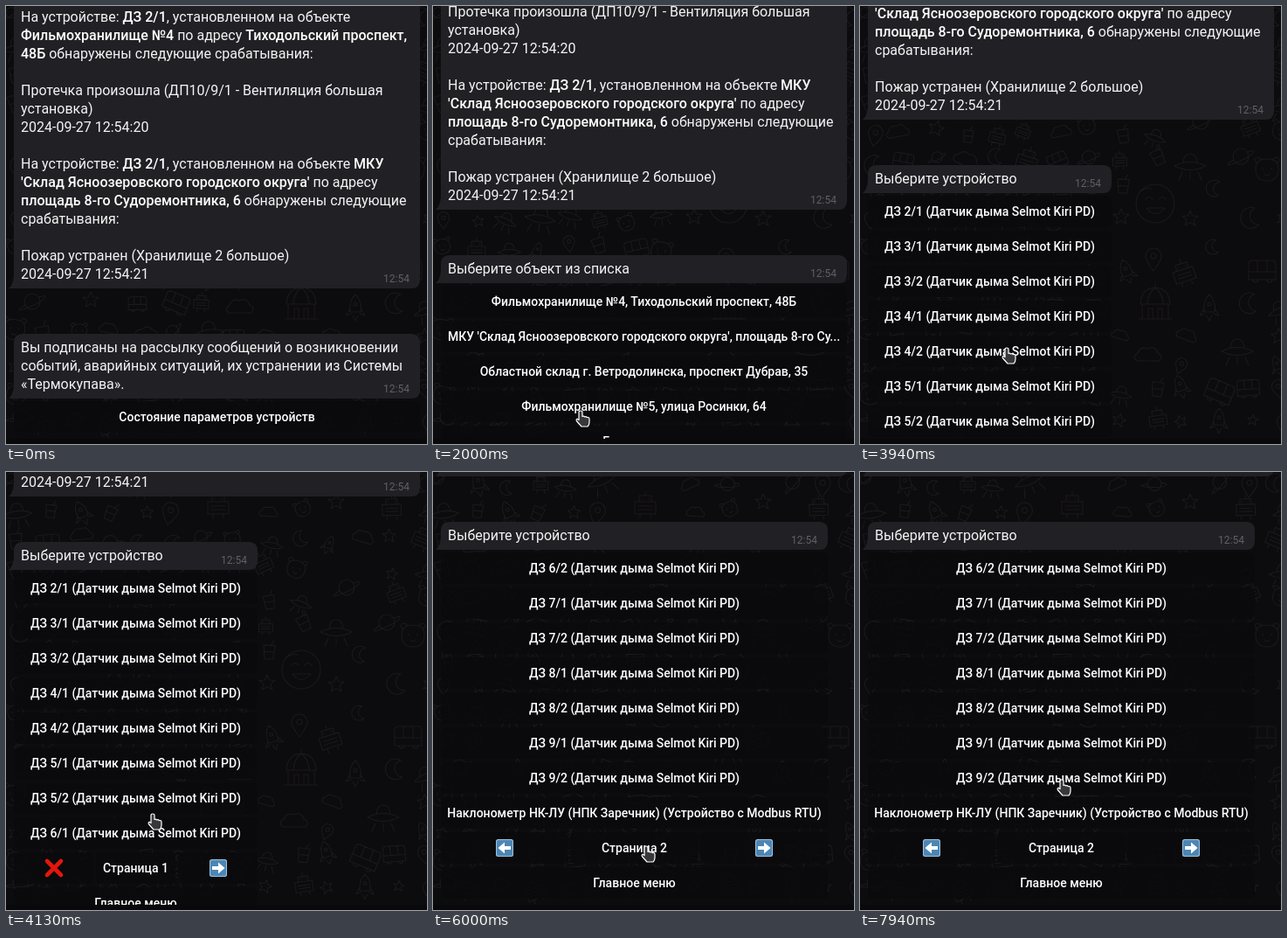
Write an HTML page that moves like this. It is 482 px wide and 501 px high and loops after 8000 ms.

```html
<!DOCTYPE html>
<html lang="ru">
<head>
<meta charset="utf-8">
<style>
html, body { margin: 0; width: 100%; height: 100%; overflow: hidden; background: #0c0b0e; }
svg { display: block; width: 482px; height: 501px; font-family: Roboto, sans-serif; }
.msg { font-size: 16px; fill: #f4f4f5; }
.msg tspan { font-weight: 500; fill: #fff; }
.time { font-size: 12px; fill: #616064; text-anchor: end; }
.label { font-size: 14px; font-weight: 500; fill: #fff; text-anchor: middle; }
.bubble { fill: #212024; }
.key { fill: #0a090c; fill-opacity: .78; }
.doodle { fill: none; stroke: #1a191c; stroke-linecap: round; stroke-linejoin: round; }
.cursor { fill: #38383b; stroke: #fff; stroke-width: 1.2; stroke-linejoin: round; }
</style>
</head>
<body>
<svg id="stage" viewBox="0 0 482 501">
  <rect width="482" height="501" fill="#0c0b0e"/>
  <g id="wall" class="doodle"></g>
  <g id="chat"></g>
  <rect y="495" width="482" height="6" fill="#09080b"/>
  <g id="cursor" class="cursor">
    <path id="arrow" d="M0 0V15L3.6 11.8L6 17L8.4 16L6.1 10.9H11Z"/>
    <path id="hand" d="M-2 1.8Q-2 0 0 0Q2 0 2 1.8V6.5Q3.6 5.5 4.6 7Q6.3 6 7.3 7.6Q10 7 10 9.6V13Q10 16 8 18H1L-4.4 12Q-5.6 10 -4 9.2L-2 10.6Z"/>
  </g>
</svg>
<script>
const LOOP = 8000;
const $ = id => document.getElementById(id);

function add(parent, tag, attrs, text) {
  const el = document.createElementNS('http://www.w3.org/2000/svg', tag);
  for (const k in attrs) el.setAttribute(k, attrs[k]);
  if (text) el.textContent = text;
  parent.appendChild(el);
  return el;
}

// ---- wallpaper ----
const SHAPES = {
  star: 'M0-9L2.6-3L9-2.6L4 1.6L5.8 8L0 4.5L-5.8 8L-4 1.6L-9-2.6L-2.6-3Z',
  planet: 'M-9 0A9 9 0 1 0 9 0A9 9 0 1 0-9 0M-8 4C-20 11-16 12 0 5S20-10 8-5',
  face: 'M-22 0A22 22 0 1 0 22 0A22 22 0 1 0-22 0M-11-5Q-7-10-3-5M4-5Q8-10 12-5M-10 5Q0 18 11 5ZM-17-14Q-10-19-4-17',
  dome: 'M-17 0Q-16-18 0-19Q16-18 17 0ZM-15 0V17H15V0M-8 17V5H-3V17M3 17V5H8V17M0-19V-25M-19 17H19M-9-1Q-8-13 0-19Q8-13 9-1',
  rocket: 'M0-15Q8-8 6 5H-6Q-8-8 0-15ZM-6 1L-11 9L-5 7M6 1L11 9L5 7M-3 9L0 15L3 9M-2-4A2 2 0 1 0 2-4A2 2 0 1 0-2-4',
  ufo: 'M-18 3Q0-6 18 3Q0 12-18 3ZM-8-1Q-7-11 0-11Q7-11 8-1M-9 10L-13 19M9 10L13 19M0 10V18',
  bear: 'M-13 0Q-14-13 0-13Q14-13 13 0Q12 12 0 12Q-12 12-13 0M-11-8Q-18-14-10-15L-6-12M11-8Q18-14 10-15L6-12M-5-3V-1M5-3V-1M-3 4Q0 8 3 4',
  bus: 'M-15-9Q-15-13-10-13H12Q16-13 16-8V9H-15ZM-15 0H16M-5-13V0M6-13V0M-10 9A3 3 0 1 0-4 9M6 9A3 3 0 1 0 12 9',
  robot: 'M-12-5H12V9H-12ZM-7-5V-12H7V-5M-4-9V-8M4-9V-8M0-12V-17M-6 9V14M6 9V14M-8 0H8M-8 4H8',
  cloud: 'M-13 6Q-19 1-12-3Q-9-11-1-8Q8-12 11-3Q18 0 13 6Z',
  pin: 'M0 13Q-10 0-9-5Q-7-13 0-13Q7-13 9-5Q10 0 0 13M-3-4A3 3 0 1 0 3-4A3 3 0 1 0-3-4',
  cup: 'M-8-9H8L6 10H-6ZM-7 0H7M2-9L6-16',
  moon: 'M5-11A12 12 0 1 0 10 8A10 10 0 0 1 5-11Z'
};
const PLACED = [
  ['face', 338, 226], ['dome', 338, 341], ['planet', 436, 172], ['ufo', 378, 180], ['bear', 466, 188],
  ['bus', 460, 304], ['robot', 243, 39], ['rocket', 400, 345], ['pin', 336, 290], ['star', 299, 241],
  ['star', 378, 243], ['planet', 390, 132], ['star', 378, 34], ['moon', 447, 242], ['cloud', 330, 400],
  ['ufo', 432, 392], ['planet', 30, 338], ['star', 97, 336], ['cloud', 268, 345]
];

function doodle(name, x, y, turn, size) {
  add($('wall'), 'path', {
    d: SHAPES[name], 'stroke-width': 1.1 / size,
    transform: `translate(${x} ${y}) rotate(${turn}) scale(${size})`
  });
}

let seed = 77;
const rnd = () => (seed = seed * 16807 % 2147483647) / 2147483647;
const names = Object.keys(SHAPES).filter(n => n !== 'face' && n !== 'dome');
PLACED.forEach(([n, x, y]) => doodle(n, x, y, 0, 1));
for (let y = 12; y < 500; y += 33) {
  for (let x = 12; x < 490; x += 36) {
    const px = x + rnd() * 12 - 6, py = y + rnd() * 12 - 6;
    const name = names[Math.floor(rnd() * names.length)];
    const turn = rnd() * 50 - 25, size = .65 + rnd() * .35;
    if (PLACED.every(p => Math.hypot(p[1] - px, p[2] - py) > 33)) doodle(name, px, py, turn, size);
  }
}

// ---- chat ----
const LEFT = 9, TOP = 375;

function bubble(g, right, top, bottom) {
  const r = 10, x = right, b = bottom;
  add(g, 'path', { class: 'bubble', d:
    `M${LEFT + r} ${top}H${x - r}Q${x} ${top} ${x} ${top + r}V${b - r}Q${x} ${b} ${x - r} ${b}` +
    `H3Q8 ${b - 4} ${LEFT} ${b - 14}V${top + r}Q${LEFT} ${top} ${LEFT + r} ${top}Z` });
  add(g, 'text', { class: 'time', x: right - 12, y: b - 7 }, '12:54');
}

// Text between asterisks is set bold.
function lines(g, y, list) {
  list.forEach((line, i) => {
    const el = add(g, 'text', { class: 'msg', x: 17, y: y + 21 * i });
    line.split('*').forEach((part, k) => {
      if (k % 2) add(el, 'tspan', {}, part);
      else el.append(part);
    });
  });
}

function icon(g, kind, x, y) {
  const el = add(g, 'g', { transform: `translate(${x} ${y})` });
  if (kind === '#x') {
    add(el, 'path', { d: 'M-8-8L8 8M8-8L-8 8', stroke: '#e3170d', 'stroke-width': 4.6, 'stroke-linecap': 'round' });
    return;
  }
  add(el, 'rect', { x: -10, y: -10, width: 20, height: 20, rx: 2.5, fill: '#9fc3dd' });
  add(el, 'rect', { x: -9, y: -9, width: 18, height: 18, rx: 2, fill: '#4c86b4' });
  add(el, 'path', { d: 'M-7-2H0V-6.5L7.5 0L0 6.5V2H-7Z', fill: '#fff', transform: kind === '#prev' ? 'scale(-1 1)' : '' });
}

function keyboard(g, right, top, rows) {
  rows.forEach((row, i) => {
    const cells = [].concat(row), gap = 3;
    const w = (right - LEFT - gap * (cells.length - 1)) / cells.length;
    const mid = top + 21 + 40 * i;
    cells.forEach((cell, k) => {
      const x = LEFT + k * (w + gap);
      add(g, 'rect', { class: 'key', x, y: mid - 18, width: w, height: 36, rx: 6 });
      if (cell[0] === '#') icon(g, cell, Math.round(x + w / 2), mid);
      else add(g, 'text', { class: 'label', x: x + w / 2, y: mid + 5 }, cell);
    });
  });
}

function reply(right, text, rows) {
  const g = add($('chat'), 'g', {});
  const bottom = TOP + 32 + 21 * (text.length - 1);
  bubble(g, right, TOP, bottom);
  lines(g, TOP + 21, text);
  keyboard(g, right, bottom, rows);
  return g;
}

bubble($('chat'), 474, -60, 323);
lines($('chat'), 18, [
  'На устройстве: *ДЗ 2/1*, установленном на объекте',
  '*Фильмохранилище №4* по адресу *Тиходольский проспект,*',
  '*48Б* обнаружены следующие срабатывания:',
  '',
  'Протечка произошла (ДП10/9/1 - Вентиляция большая',
  'установка)',
  '2024-09-27 12:54:20',
  '',
  'На устройстве: *ДЗ 2/1*, установленном на объекте *МКУ*',
  "*'Склад Ясноозеровского городского округа'* по адресу",
  '*площадь 8-го Судоремонтника, 6* обнаружены следующие',
  'срабатывания:',
  '',
  'Пожар устранен (Хранилище 2 большое)',
  '2024-09-27 12:54:21'
]);

const smoke = list => list.split(' ').map(n => `ДЗ ${n} (Датчик дыма Selmot Kiri PD)`);
const MENU = 'Главное меню';
const views = [
  [0, reply(474, [
    'Вы подписаны на рассылку сообщений о возникновении',
    'событий, аварийных ситуаций, их устранении из Системы',
    '«Термокупава».'
  ], ['Состояние параметров устройств'])],
  [1884, reply(474, ['Выберите объект из списка'], [
    'Фильмохранилище №4, Тиходольский проспект, 48Б',
    "МКУ 'Склад Ясноозеровского городского округа', площадь 8-го Су...",
    'Областной склад г. Ветродолинска, проспект Дубрав, 35',
    'Фильмохранилище №5, улица Росинки, 64',
    MENU
  ])],
  [3866, reply(288, ['Выберите устройство'], [
    ...smoke('2/1 3/1 3/2 4/1 4/2 5/1 5/2 6/1'),
    ['#x', 'Страница 1', '#next'], MENU
  ])],
  [6000, reply(452, ['Выберите устройство'], [
    ...smoke('6/2 7/1 7/2 8/1 8/2 9/1 9/2'),
    'Наклонометр НК-ЛУ (НПК Заречник) (Устройство с Modbus RTU)',
    ['#prev', 'Страница 2', '#next'], MENU
  ])]
];

// ---- motion ----
const clamp = v => Math.max(0, Math.min(1, v));
const easeOut = (t, from, to) => 1 - Math.pow(1 - clamp((t - from) / (to - from)), 3);
const scroll = t => 118 * easeOut(t, views[1][0], 2190) + 200 * easeOut(t, views[2][0], 4380);

// time, x, y of the pointer tip
const PATH = [
  [630, 340, 140], [750, 215, 290], [850, 80, 440], [1000, 169, 463],
  [2500, 169, 463], [2620, 184, 452], [2750, 182, 441], [2950, 172, 418], [3100, 163, 398], [3250, 168, 391],
  [5130, 168, 391], [5440, 241, 427], [5630, 241, 427], [5810, 244, 428],
  [6630, 244, 428], [7060, 237, 409], [7380, 237, 409], [7690, 231, 352]
];

function pointer(t) {
  const i = PATH.findIndex(p => p[0] > t);
  if (i < 0) return PATH[PATH.length - 1].slice(1);
  const [t0, x0, y0] = PATH[i - 1], [t1, x1, y1] = PATH[i];
  const k = (t - t0) / (t1 - t0);
  return [x0 + (x1 - x0) * k, y0 + (y1 - y0) * k];
}

const show = (el, on) => el.setAttribute('display', on ? 'inline' : 'none');

function draw(t) {
  $('chat').setAttribute('transform', `translate(0 ${-Math.round(scroll(t))})`);
  views.forEach(([start, g], i) => show(g, t >= start && (i === 3 || t < views[i + 1][0])));
  const on = t >= PATH[0][0];
  show($('cursor'), on);
  if (!on) return;
  const [x, y] = pointer(t).map(Math.round);
  $('cursor').setAttribute('transform', `translate(${x} ${y})`);
  const overKey = t >= 950;
  show($('hand'), overKey);
  show($('arrow'), !overKey);
}

const begin = performance.now();
function tick() {
  draw((performance.now() - begin) % LOOP);
  requestAnimationFrame(tick);
}
tick();
</script>
</body>
</html>
```
